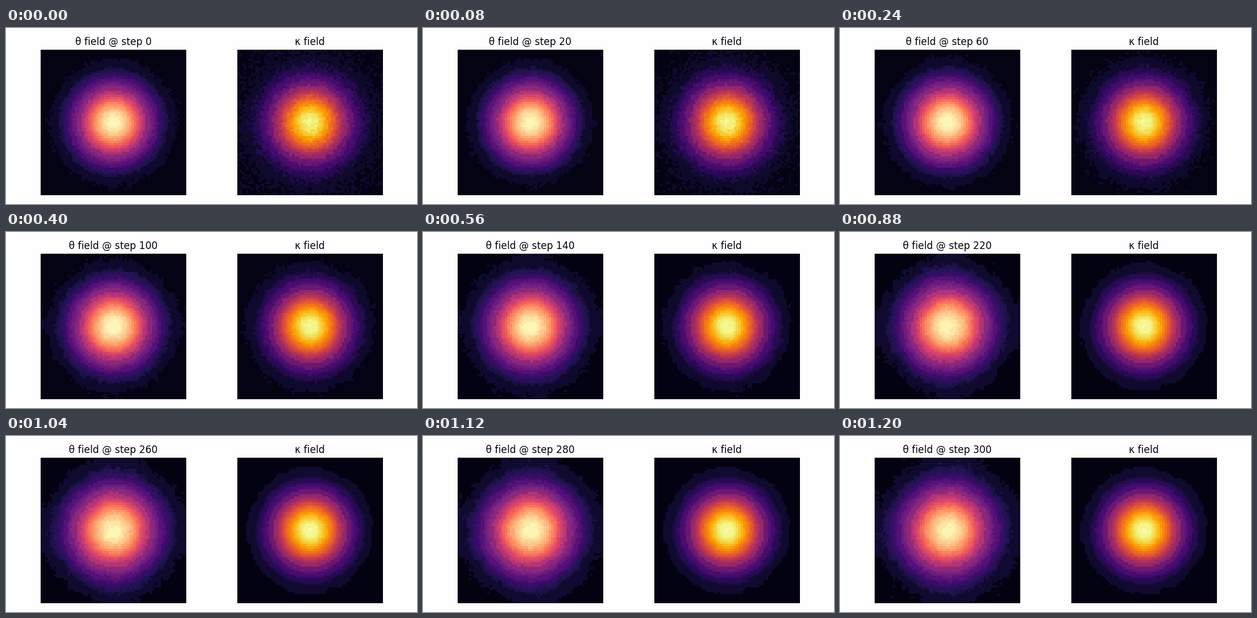
Animation of 700x300 px, one loop 1280 ms. Source, as a matplotlib script:

```python
import numpy as np
import matplotlib.pyplot as plt
from matplotlib.animation import FuncAnimation

WIDTH, HEIGHT, DPI = 700, 300, 100
CELLS = 64
FRAMES, STEPS_PER_FRAME, INTERVAL = 16, 20, 80


def diffuse(field, rate):
    neighbours = sum(np.roll(field, shift, axis) for shift in (-1, 1) for axis in (0, 1))
    return field + rate * (neighbours - 4 * field)


def simulate():
    """Theta spreads under steady noise; kappa only smooths its initial noise."""
    rng = np.random.default_rng(7)
    x, y = np.meshgrid(*[np.linspace(-1, 1, CELLS)] * 2)
    bump = np.exp(-4 * (x**2 + y**2))
    theta = bump + 0.0075 * rng.standard_normal(bump.shape)
    kappa = bump + 0.017 * rng.standard_normal(bump.shape)
    states = []
    for step in range(FRAMES * STEPS_PER_FRAME):
        if step % STEPS_PER_FRAME == 0:
            states.append((theta, kappa))
        theta = diffuse(theta, 0.075) + 0.0037 * rng.standard_normal(bump.shape)
        kappa = diffuse(kappa, 0.0022)
    return states


def colourise(field, cmap):
    scaled = (field - field.min()) / np.ptp(field)
    return plt.get_cmap(cmap)(scaled, bytes=True)[..., :3]


def reduce_colours(rgb):
    """Replace each colour by the mean of its coarse RGB bucket."""
    flat = rgb.reshape(-1, 3).astype(int)
    keys = (flat[:, 0] >> 5) * 128 + (flat[:, 1] >> 4) * 8 + (flat[:, 2] >> 5)
    _, bucket = np.unique(keys, return_inverse=True)
    bucket = bucket.ravel()
    counts = np.bincount(bucket)
    means = np.stack([np.bincount(bucket, flat[:, c]) / counts for c in range(3)], axis=1)
    return means[bucket].astype(np.uint8).reshape(rgb.shape)


def render(state):
    theta, kappa = state
    return reduce_colours(np.stack([colourise(theta, "magma"), colourise(kappa, "inferno")]))


pictures = [render(state) for state in simulate()]

plt.rcParams["font.family"] = "DejaVu Sans"
fig, axes = plt.subplots(1, 2, figsize=(WIDTH / DPI, HEIGHT / DPI), dpi=DPI,
                         facecolor="#fefefe")


def add_panel(ax, title, picture):
    ax.axis("off")
    image = ax.imshow(picture, interpolation="nearest")
    return image, ax.set_title(title, fontsize=12, color="#02010e")


theta_image, theta_title = add_panel(axes[0], "θ field @ step 0", pictures[0][0])
kappa_image, _ = add_panel(axes[1], "κ field", pictures[0][1])
fig.tight_layout()


def update(frame):
    theta_image.set_data(pictures[frame][0])
    kappa_image.set_data(pictures[frame][1])
    theta_title.set_text(f"θ field @ step {frame * STEPS_PER_FRAME}")
    return theta_image, kappa_image, theta_title


animation = FuncAnimation(fig, update, frames=FRAMES, interval=INTERVAL,
                          repeat=True, repeat_delay=0, blit=False)
plt.show()
```
